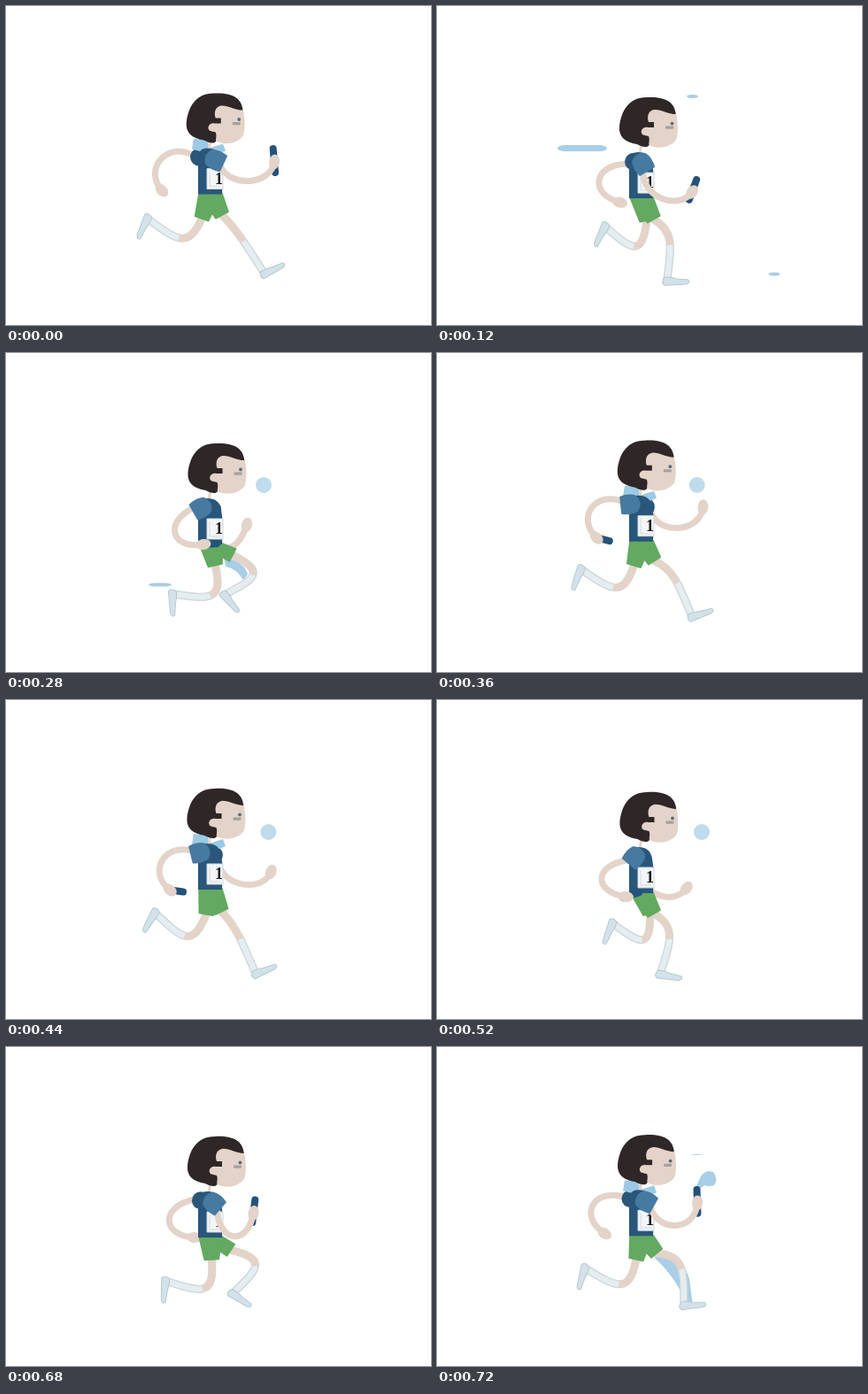
Animation of 480x360 px, one loop 760 ms. Source, as an HTML page:

```html
<!DOCTYPE html>
<html lang="en">
<head>
<meta charset="utf-8">
<title>Relay runner</title>
<style>
html, body { margin: 0; width: 100%; height: 100%; overflow: hidden; background: #fff; }
svg { display: block; width: 100%; height: 100%; }
.line { fill: none; stroke-linecap: round; stroke-linejoin: round; }
.skin { stroke: #e3d3c9; }
.sock { stroke-dasharray: 0 .47 .54; stroke-linecap: butt; }
text { font: bold 18px "Liberation Serif", serif; fill: #1d1b1c; }
</style>
</head>
<body>
<svg viewBox="0 0 480 360">
  <g id="marks" fill="#a9cee5"></g>
  <circle id="drop" cy="149" r="9" fill="#bedcec"/>
  <g id="farArm"></g>
  <circle id="farSleeve" r="10" fill="#2a5678"/>
  <g id="farLeg"></g>
  <g id="nearLeg"></g>
  <path id="shorts" fill="#63a961" stroke="#63a961" stroke-width="1.5" stroke-linejoin="round"/>
  <g id="body">
    <path id="collar" fill="#9ccae4" d="M212 150L228 152L229 161L245 156L248 164L236 169L210 162Z"/>
    <path d="M231 150L229 164" class="line skin" stroke-width="3"/>
    <path fill="#29567a" d="M217 173Q217 161 227 161Q241 161 243 174L245 188L244 213H217Z"/>
    <path fill="#f3f5f6" stroke="#cfd9df" d="M227 184H245V207H227Z"/>
    <path fill="none" stroke="#dde3e6" stroke-width="1.5" d="M230 187V204H242"/>
    <text x="240.5" y="201" text-anchor="middle">1</text>
  </g>
  <g id="head">
    <path fill="#2f2627" d="M238 152C236 157 230 155 224 152C210 150 203 143 204 132C206 115 214 99 235 99C256 98 267 104 268 120L258 144Z"/>
    <path fill="#e3d3c9" d="M268 118C258 118 250 112 243 113C236 114 235 122 237 127L243 127L243 133L236 133C228 131 226 142 233 142L237 143C239 148 236 152 238 153C246 158 262 156 268 147C271 140 270 125 268 118Z"/>
    <circle cx="263.5" cy="128.5" r="1.9" fill="#5a6b77"/>
    <rect x="256" y="131.5" width="9" height="3.2" rx="1" fill="#a5a09f"/>
  </g>
  <path id="baton" class="line" stroke="#24527a" stroke-width="8"/>
  <g id="nearArm"></g>
  <path id="nearSleeve" fill="#477aa1" d="M11 -10L11 10Q0 13 -8 9Q-15 0 -8 -9Q0 -13 11 -10Z"/>
</svg>
<script>
const LOOP = 760, STEP = 40;
const $ = id => document.getElementById(id);

// Phase, hip, ankle, foot angle; both legs share the cycle half a loop apart
const stride = [
  [0,   244, 236, 292, 302, -26],
  [130, 245, 241, 256, 310, 6],
  [220, 246, 240, 213, 293, 66],
  [380, 221, 240, 160, 240, 115],
  [500, 237, 242, 190, 249, 116],
  [600, 256, 229, 238, 268, 84],
  [660, 256, 228, 247, 273, 50]
];
// Phase and hand position, shared by both arms
const reach = [
  [0, 303, 176], [120, 288, 210], [280, 223, 216], [380, 176, 208],
  [510, 210, 222], [600, 248, 212], [720, 294, 176]
];

// Smooth looping curve through the keys
function pose(keys, t) {
  t %= LOOP;
  const n = keys.length;
  const at = i => {
    const lap = Math.floor(i / n), k = keys[i - lap * n];
    return [k[0] + lap * LOOP, ...k.slice(1)];
  };
  let i = n - 1;
  while (keys[i][0] > t) i--;
  const [a, b, c, d] = [at(i - 1), at(i), at(i + 1), at(i + 2)];
  const h = c[0] - b[0], u = (t - b[0]) / h;
  return b.map((y, j) => {
    const m0 = (c[j] - a[j]) / (c[0] - a[0]) * h, m1 = (d[j] - b[j]) / (d[0] - b[0]) * h;
    return y + (c[j] - y) * u * u * (3 - 2 * u) + u * (1 - u) * ((1 - u) * m0 - u * m1);
  }).slice(1);
}

// Rubber limb: controls at u1 and u2 along the chord, pushed aside by k1 and k2
function hose([x, y], [x2, y2], u1, k1, u2, k2) {
  const dx = x2 - x, dy = y2 - y, d = Math.hypot(dx, dy);
  const control = (u, k) => [x + dx * u - dy / d * k, y + dy * u + dx / d * k];
  const c1 = control(u1, k1), c2 = control(u2, k2);
  return { d: `M${x} ${y}C${[...c1, ...c2, x2, y2].join(" ")}`, turn: angle(x2 - c2[0], y2 - c2[1]) };
}

const rad = deg => deg * Math.PI / 180;
const angle = (x, y) => Math.atan2(y, x) * 180 / Math.PI;
const dist = (p, q) => Math.hypot(q[0] - p[0], q[1] - p[1]);
const polar = ([x, y], deg, r) => [x + r * Math.cos(rad(deg)), y + r * Math.sin(rad(deg))];
const place = (x, y, turn = 0) => `translate(${x} ${y}) rotate(${turn})`;
const sway = t => Math.cos(2 * Math.PI * t / LOOP);
const bob = t => 6.5 * Math.sin(2 * Math.PI * t / LOOP) ** 2 - .5;

function set(el, attrs) {
  for (const k in attrs) el.setAttribute(k, attrs[k]);
  return el;
}
function add(parent, tag, attrs) {
  return set(parent.appendChild(document.createElementNS("http://www.w3.org/2000/svg", tag)), attrs);
}
const show = (el, on) => set(el, { visibility: on ? "visible" : "hidden" });

function makeLeg(id) {
  const line = (cls, width, stroke) =>
    add($(id), "path", { class: "line " + cls, "stroke-width": width, stroke, pathLength: 1 });
  const lines = [line("skin", 9, "#e3d3c9"), line("sock", 8.5, "#c5d9e2"), line("sock", 6.5, "#e5edef")];
  const foot = add($(id), "path", {
    d: "M-3 -4Q4 -5 10 -3L24 -2Q27 1 22 3L-3 5Q-7 2 -3 -4Z", fill: "#d3e1e8", stroke: "#b3cad5"
  });
  return t => {
    const [hx, hy, ax, ay, turn] = pose(stride, t);
    const hip = [hx, hy], ankle = [ax, ay];
    const bend = -Math.min(42, 1.5 * Math.max(0, 84 - dist(hip, ankle)));
    const { d } = hose(hip, ankle, .25, bend, .47, bend * .7);
    lines.forEach(l => set(l, { d }));
    set(foot, { transform: place(ax, ay, turn) });
    return hip;
  };
}

function makeArm(id) {
  const arm = add($(id), "path", { class: "line skin", "stroke-width": 7 });
  const palm = add($(id), "ellipse", { rx: 8.5, ry: 6, fill: "#e3d3c9" });
  return t => {
    const s = sway(t), turn = 100 - 75 * s;
    const sleeve = [227 + 9 * s, 172.5 + 1.5 * s + bob(t)];
    const shoulder = polar(sleeve, turn + 25, 10), hand = pose(reach, t);
    const bend = .6 * (103 - dist(shoulder, hand));
    const limb = hose(shoulder, hand, .15, bend, .9, bend);
    set(arm, { d: limb.d });
    set(palm, { transform: place(...hand, limb.turn) });
    return { sleeve, turn, hand };
  };
}

// One trouser leg, from the waist to a hem square to the thigh
function trouser(hip, waist) {
  const across = angle(hip[0] - 231, hip[1] - waist) - 90;
  const hem = [polar(hip, across, 8), polar(hip, across, -8)];
  return `M218 ${waist}L244 ${waist}L${hem.join("L")}Z`;
}

// Marks that last a single step
const marks = [];
const mark = (at, tag, attrs) => marks.push({ at, el: add($("marks"), tag, attrs) });
const dash = (at, cx, cy, rx, ry) => mark(at, "rect", { x: cx - rx, y: cy - ry, width: rx * 2, height: ry * 2, rx: 9, ry });
dash(120, 164, 160.5, 28, 3.5);
dash(120, 288.5, 102, 6.5, 2);
dash(120, 381, 302.5, 6.5, 2);
dash(280, 174, 261.5, 13, 2);
dash(600, 254, 318.5, 6, 1.5);
dash(720, 293.5, 121.5, 7.5, .5);
mark(280, "path", { d: "M246 230Q270 236 273 250L268 256Q260 243 248 241Z" });
mark(720, "path", { d: "M246 233L258 230Q280 242 285 262L289 292L281 290Q273 264 246 238Z" });
mark(720, "path", { d: "M298 146Q303 138 312 141Q318 149 313 156Q307 158 302 156L296 161L293 157Z" });

const farLeg = makeLeg("farLeg"), nearLeg = makeLeg("nearLeg");
const farArm = makeArm("farArm"), nearArm = makeArm("nearArm");

function draw(t) {
  const other = t + LOOP / 2, drop = bob(t);
  set($("head"), { transform: place(drop * .5, drop) });
  set($("body"), { transform: place(0, drop) });
  show($("collar"), drop < 1);

  const hips = [farLeg(t), nearLeg(other)];
  set($("shorts"), { d: hips.map(hip => trouser(hip, 212 + drop)).join("") });

  const far = farArm(other), near = nearArm(t);
  set($("farSleeve"), { cx: far.sleeve[0], cy: far.sleeve[1] });
  set($("nearSleeve"), { transform: place(...near.sleeve, near.turn) });

  const tilt = 140 - 55 * sway(t);
  const ends = [polar(near.hand, tilt, -15), polar(near.hand, tilt, 6 + 6 * sway(t))];
  set($("baton"), { d: "M" + ends.join("L") });

  show(set($("drop"), { cx: 291 + (t - 280) / 30 }), t >= 240 && t < 560);
  marks.forEach(m => show(m.el, t === m.at));
}

const start = performance.now();
function tick() {
  const t = (performance.now() - start) % LOOP;
  draw(Math.floor(t / STEP) * STEP);
  requestAnimationFrame(tick);
}
tick();
</script>
</body>
</html>
```
